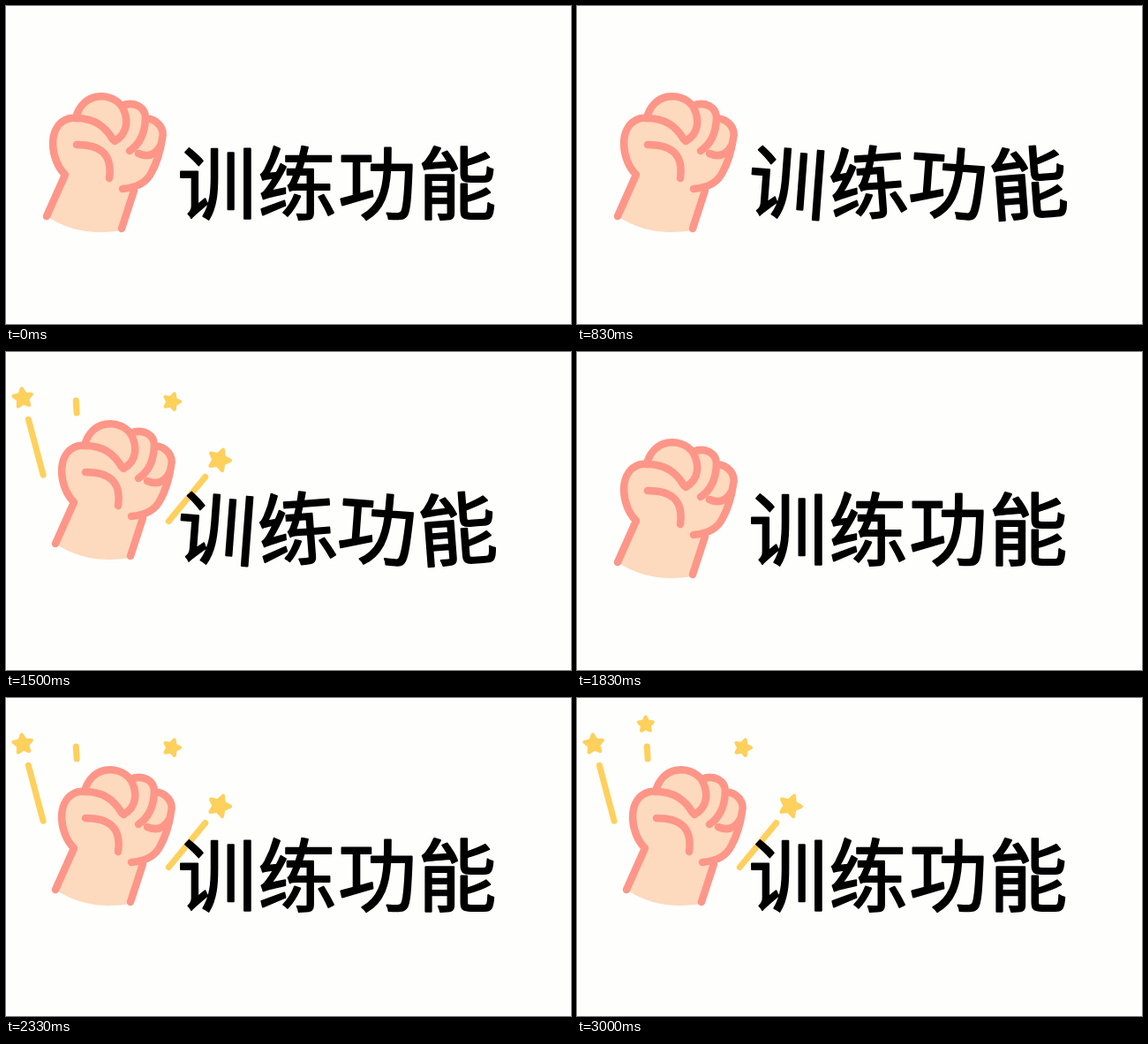
An HTML page with a canvas for the animation above (3080 ms loop, 640 by 360 pixels).

```html
<!DOCTYPE html>
<html lang="zh">
<head>
<meta charset="utf-8">
<style>
html, body { margin: 0; width: 100%; height: 100%; overflow: hidden; background: #fefefc; }
canvas { display: block; width: 640px; height: 360px; }
</style>
</head>
<body>
<canvas id="stage" width="640" height="360"></canvas>
<script>
const ctx = document.getElementById('stage').getContext('2d');
const LOOP = 3080, STEP = 250 / 3;
const FIST_PERIOD = 9.9, WOBBLE_PERIOD = 2.75;
const PAPER = '#fefefc', SKIN = '#fdd9bd', EDGE = '#fd9688', GOLD = '#fed05c';

const contour = 'M46 238 L67 191 C50 174 47 139 67 129 Q72 126 79 127' +
  ' C86 98 117 96 131 113 C146 107 158 115 158 127' +
  ' C172 128 180 139 177 150 C175 163 171 177 165 188 Q157 205 132 207';
const palm = new Path2D(contour + ' L145 208 L131 254 Q82 262 46 238 Z');
const lines = [
  contour,
  'M79 127 C100 127 112 136 121 151',
  'M131 113 C139 127 139 144 123 153',
  'M158 127 Q157 153 140 164',
  'M80 157 C105 157 121 166 117 195',
  'M175 158 Q166 174 150 167',
  'M145 209 L131 252'
].map(d => new Path2D(d));

// Each star flies from (x, y) at the given angle; its ray trails behind.
const sparks = [
  { x: 28, y: 86, angle: -1.83, travel: 35, size: 16, ray: 65 },
  { x: 79, y: 50, angle: -1.63, travel: 20, size: 13, ray: 14, brief: true },
  { x: 174, y: 77, angle: -.98, travel: 25, size: 14, ray: 0 },
  { x: 227, y: 140, angle: -.88, travel: 23, size: 18, ray: 65 }
];

const clamp = v => Math.min(1, Math.max(0, v));

function drawStar(x, y, r, tilt) {
  ctx.beginPath();
  for (let i = 0; i < 10; i++) {
    const a = tilt + (i / 5 - .5) * Math.PI;
    const d = (r - 2) * (i % 2 ? .5 : 1);
    ctx.lineTo(x + d * Math.cos(a), y + d * Math.sin(a));
  }
  ctx.closePath();
  ctx.lineWidth = 4;
  ctx.fill();
  ctx.stroke();
}

function drawSpark(s, reach) {
  const cos = Math.cos(s.angle), sin = Math.sin(s.angle);
  const x = s.x + s.travel * reach * cos, y = s.y + s.travel * reach * sin;
  const gap = 25;
  ctx.fillStyle = ctx.strokeStyle = GOLD;
  if (!s.brief || reach < 1) drawStar(x, y, s.size * (1 - .2 * reach), (s.angle + 1.6) * .5);
  if (!s.ray) return;
  ctx.lineWidth = 7;
  ctx.beginPath();
  ctx.moveTo(x - gap * cos, y - gap * sin);
  ctx.lineTo(x - (gap + s.ray) * cos, y - (gap + s.ray) * sin);
  ctx.stroke();
}

function drawFist(raised) {
  ctx.save();
  if (raised) ctx.translate(10, -21);
  ctx.fillStyle = SKIN;
  ctx.fill(palm);
  ctx.strokeStyle = EDGE;
  ctx.lineWidth = 8.5;
  lines.forEach(p => ctx.stroke(p));
  ctx.restore();
}

function drawTitle(tilted) {
  ctx.font = '400 89px "Noto Sans CJK SC", "Noto Sans CJK", sans-serif';
  ctx.textAlign = 'center';
  ctx.fillStyle = ctx.strokeStyle = '#000';
  ctx.lineWidth = 2;
  [...'训练功能'].forEach((ch, i) => {
    ctx.save();
    ctx.translate(239 + i * 90.7, 200);
    if (tilted) ctx.rotate((i % 2 ? -1 : 1) * .075);
    ctx.fillText(ch, 0, 33.7);
    ctx.strokeText(ch, 0, 33.7);
    ctx.restore();
  });
}

function draw(now) {
  const t = now % LOOP;
  // 12 pictures a second, on a 10 ms grid
  const tick = Math.floor((Math.floor(t / 10) * 10 + 5) / STEP);
  const phase = tick % FIST_PERIOD;
  const sway = tick % WOBBLE_PERIOD;
  const raised = phase > 4.4 && phase < 8.6;
  const reach = clamp((phase - 5.2) / 1.1);

  ctx.fillStyle = PAPER;
  ctx.fillRect(0, 0, 640, 360);
  ctx.lineCap = ctx.lineJoin = 'round';
  if (raised) sparks.forEach(s => drawSpark(s, reach));
  drawFist(raised);
  drawTitle(sway > .55 && sway < 1.95);
}

let start;
function loop(now) {
  start ??= now;
  draw(now - start);
  requestAnimationFrame(loop);
}
draw(0);
requestAnimationFrame(loop);
</script>
</body>
</html>
```
